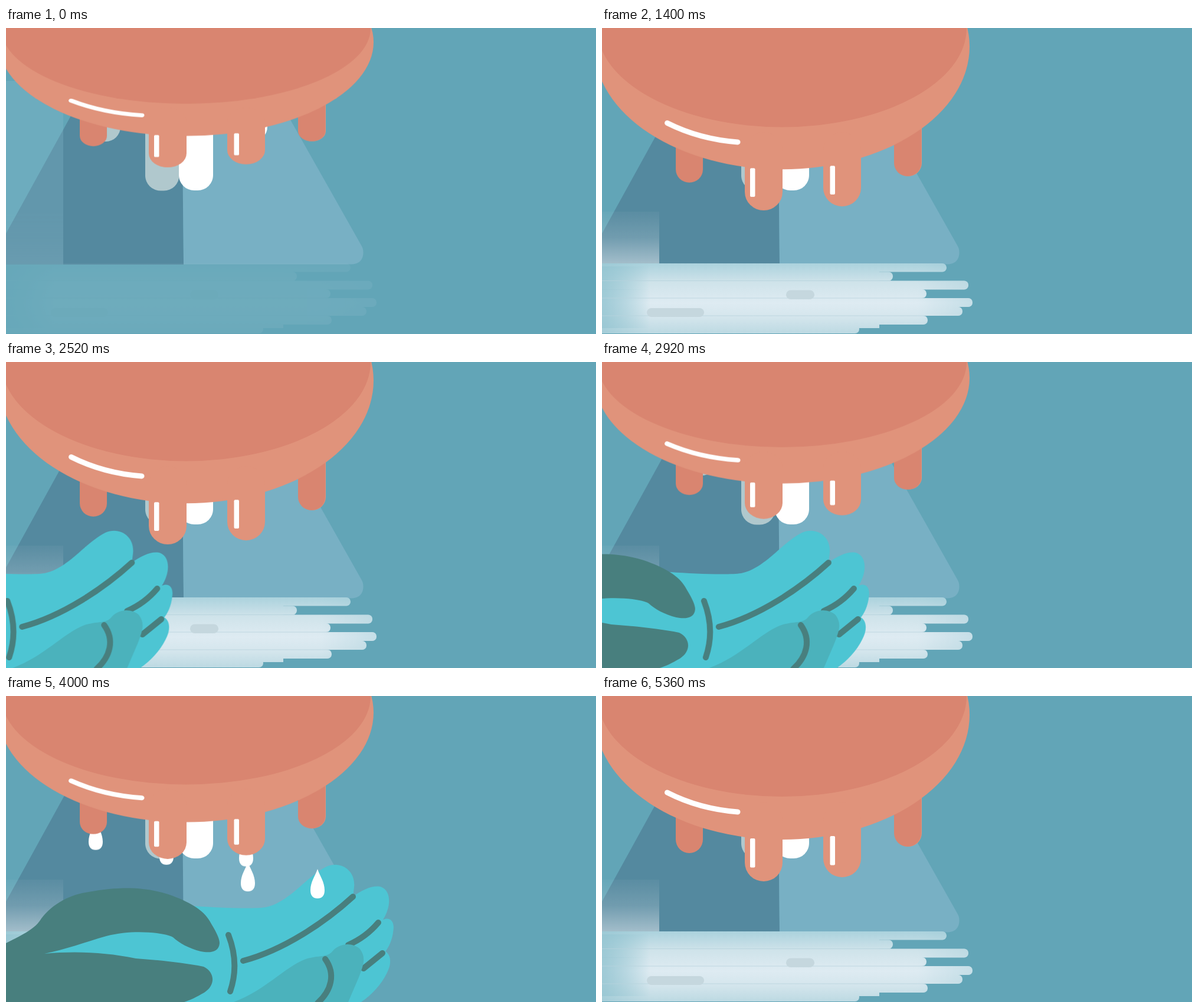
An HTML page that plays this animation: 1000 px wide and 520 px high, repeating every 5.44 s.

```html
<!DOCTYPE html>
<html lang="en">
<head>
<meta charset="utf-8">
<title>Milking</title>
<style>
  html, body { margin: 0; width: 100%; height: 100%; overflow: hidden; background: #62a5b7; }
  svg { display: block; width: 100%; height: 100%; }

  #udder, #haze, #puddle, #hand, #hand-in, #pool, .drop { animation: 5.44s linear infinite both; }

  #udder { animation-name: stretch; animation-timing-function: ease-in-out; }
  @keyframes stretch {
    0% { transform: scaleY(.752); }
    10.29%, 20.59%, 30.88%, 41.18%, 51.47% { transform: scaleY(.76); }
    5.15%, 15.44%, 25.74%, 36.03%, 46.32%, 56.62%, 60.29% { transform: scaleY(.984); }
    70.59% { transform: scaleY(.755); }
    76.47%, 100% { transform: scaleY(1); }
  }

  #haze { animation-name: clear; }
  @keyframes clear { 0% { opacity: 1; } 12%, 100% { opacity: 0; } }

  #puddle { animation-name: spill; }
  @keyframes spill { 0% { opacity: .1; } 22%, 100% { opacity: 1; } }

  #hand-in { animation-name: reach; }
  @keyframes reach {
    0%, 33.09% { transform: translateX(-682px); }
    62.5%, 100% { transform: none; }
  }

  #hand { animation-name: leave; }
  @keyframes leave { 0%, 92.65% { opacity: 1; } 98.5%, 100% { opacity: 0; } }

  #pool { animation-name: fill; transform-origin: 347px 460px; }
  @keyframes fill { 0%, 77.2% { transform: scale(0); } 83.4%, 100% { transform: scale(1); } }

  .drop { animation-name: fall; animation-delay: var(--at); animation-fill-mode: none; opacity: 0; }
  @keyframes fall {
    0% { opacity: 1; transform: none; animation-timing-function: cubic-bezier(.333, 0, .667, .333); }
    19.6% { opacity: 1; transform: translateY(212px); }
    19.7%, 100% { opacity: 0; transform: translateY(212px); }
  }
</style>
</head>
<body>
<svg viewBox="0 0 1000 520" preserveAspectRatio="none">
  <defs>
    <linearGradient id="milk" gradientUnits="userSpaceOnUse" x1="0" y1="400" x2="0" y2="520">
      <stop offset="0" stop-color="#abd2dd"/>
      <stop offset=".27" stop-color="#cfe3ea"/>
      <stop offset=".56" stop-color="#deebf2"/>
      <stop offset=".75" stop-color="#d5e6ed"/>
      <stop offset="1" stop-color="#bcd9e2"/>
    </linearGradient>
    <linearGradient id="sides" gradientUnits="userSpaceOnUse" x1="0" y1="0" x2="628" y2="0">
      <stop offset="0" stop-color="#8fc2cf" stop-opacity=".55"/>
      <stop offset=".13" stop-color="#8fc2cf" stop-opacity="0"/>
      <stop offset=".85" stop-color="#8fc2cf" stop-opacity="0"/>
      <stop offset="1" stop-color="#8fc2cf" stop-opacity=".3"/>
    </linearGradient>
    <linearGradient id="glow" x1="0" y1="0" x2="0" y2="1">
      <stop offset="0" stop-color="#d5dfe6" stop-opacity=".05"/>
      <stop offset=".5" stop-color="#d5dfe6" stop-opacity=".23"/>
      <stop offset="1" stop-color="#d5dfe6" stop-opacity=".62"/>
    </linearGradient>
    <path id="bead" d="M0-50C4-38 12-28 12-14 12-4 7 0 0 0-7 0-12-4-12-14-12-28-4-38 0-50Z"/>
    <g id="rows">
      <rect x="-40" y="400" width="624" height="14.5" rx="7.2"/>
      <rect x="-40" y="414.5" width="533" height="15" rx="7.2"/>
      <rect x="-40" y="429.5" width="661" height="15" rx="7.2"/>
      <rect x="-40" y="444" width="590" height="15" rx="7.2"/>
      <rect x="-40" y="459" width="668" height="15" rx="7.2"/>
      <rect x="-40" y="474" width="651" height="15" rx="7.2"/>
      <rect x="-40" y="489" width="592" height="15" rx="7.2"/>
      <rect x="-40" y="504" width="476" height="15" rx="7.2"/>
      <path d="M-40 405H470V510H-40Z"/>
    </g>
  </defs>

  <rect width="1000" height="520" fill="#62a5b7"/>
  <path d="M192 0H298L301 402H-29Z" fill="#54899f"/>
  <path d="M297 0H394L602 369Q607 377 605 387 602 401 585 401.500H301Z" fill="#78b0c4"/>
  <g id="haze" fill="#8fc4d4" opacity=".2">
    <path d="M0 90H97V402H0Z" fill-opacity=".25"/>
  </g>

  <g id="puddle">
    <rect y="312" width="97" height="89" fill="url(#glow)"/>
    <use href="#rows" fill="url(#milk)"/>
    <use href="#rows" fill="url(#sides)"/>
    <path d="M0 429.500H490M0 459H548M0 489H550" stroke="#b7d2dc" stroke-width=".8"/>
    <g fill="#c5d7de">
      <rect x="312" y="445.500" width="48" height="15.500" rx="7.700"/>
      <rect x="76" y="476" width="97" height="15" rx="7.500"/>
    </g>
  </g>

  <g fill="#b0c8cd">
    <rect x="144" y="100" width="50" height="93" rx="25"/>
    <rect x="236" y="100" width="57.500" height="176.500" rx="26"/>
  </g>
  <g fill="#fff">
    <rect x="293" y="100" width="58" height="176" rx="26"/>
    <rect x="393" y="100" width="50" height="93" rx="25"/>
  </g>

  <g id="hand">
    <g id="hand-in">
      <path fill="#4dc5d3" d="M40 445L200 350 320 357C360 360 420 362 440 359 480 351 508 308 543 290 568 279 593 297 590 325L588 341C605 328 625 320 637 325 654 333 652 360 639 380 650 375 659 382 656.500 398 655 415 648 428 643 434 653 440 654 456 645 472 636 490 620 508 602 520H40Z"/>
      <g fill="none" stroke="#487f7e" stroke-width="10" stroke-linecap="round">
        <path d="M402 450C470 432 540 385 588 341M377 406Q396 455 380 502M580 423Q610 410 631 385M606 463L638 437"/>
      </g>
      <path fill="#4bb2bc" d="M386 520C440 500 470 462 508 447 530 440 545 445 554 433 567 419 588 419 600 430 610 444 607 455 598 478L580 520Z"/>
      <path fill="none" stroke="#487f7e" stroke-width="10" stroke-linecap="round" d="M541 447C559 472 552 500 528 522"/>
      <path fill="#487f7e" d="M0 420C30 405 50 395 60 378 80 352 110 337 140 333 200 322 240 326 275 337 310 349 335 364 345 382 355 399 362 411 362 420 361 436 345 437 330 434 310 429 294 420 283 410 268 402 215 396 170 408 135 418 100 431 65 438 120 433 170 436 220 446 260 449 300 453 335 460 355 470 355 492 336 504 322 512 312 517 302 520H0Z"/>
    </g>
    <ellipse id="pool" cx="347" cy="460" rx="213" ry="31.500" fill="#f4f1f8" fill-opacity=".87"/>
  </g>

  <g fill="#fff">
    <g class="drop" style="--at:3.45s"><use href="#bead" x="152" y="205"/></g>
    <g class="drop" style="--at:3.5s"><use href="#bead" x="272" y="240"/></g>
    <g class="drop" style="--at:3.485s"><use href="#bead" x="407" y="240"/></g>
    <g class="drop" style="--at:3.298s"><use href="#bead" x="410" y="240"/></g>
    <g class="drop" style="--at:3.254s"><use href="#bead" x="528" y="240"/></g>
  </g>

  <g id="udder">
    <g fill="#d98570">
      <rect x="125" y="120" width="46" height="147" rx="23"/>
      <rect x="496" y="90" width="46" height="166" rx="23" fill="#e0937b"/>
      <rect x="495" y="90" width="46" height="166" rx="23"/>
    </g>
    <g fill="#e0937b">
      <ellipse cx="305" cy="32" rx="318" ry="212"/>
      <rect x="242" y="180" width="64" height="135" rx="32"/>
      <rect x="375" y="180" width="64" height="128" rx="32"/>
    </g>
    <ellipse cx="305" cy="0" rx="313" ry="171" fill="#d98570"/>
    <g fill="#fff">
      <rect x="251" y="242" width="8.500" height="49.500" rx="2"/>
      <rect x="386.500" y="238" width="8.500" height="49.500" rx="2"/>
    </g>
    <path d="M110.500 164Q165 192 230 197" fill="none" stroke="#fff" stroke-width="9" stroke-linecap="round"/>
  </g>
</svg>
</body>
</html>
```
